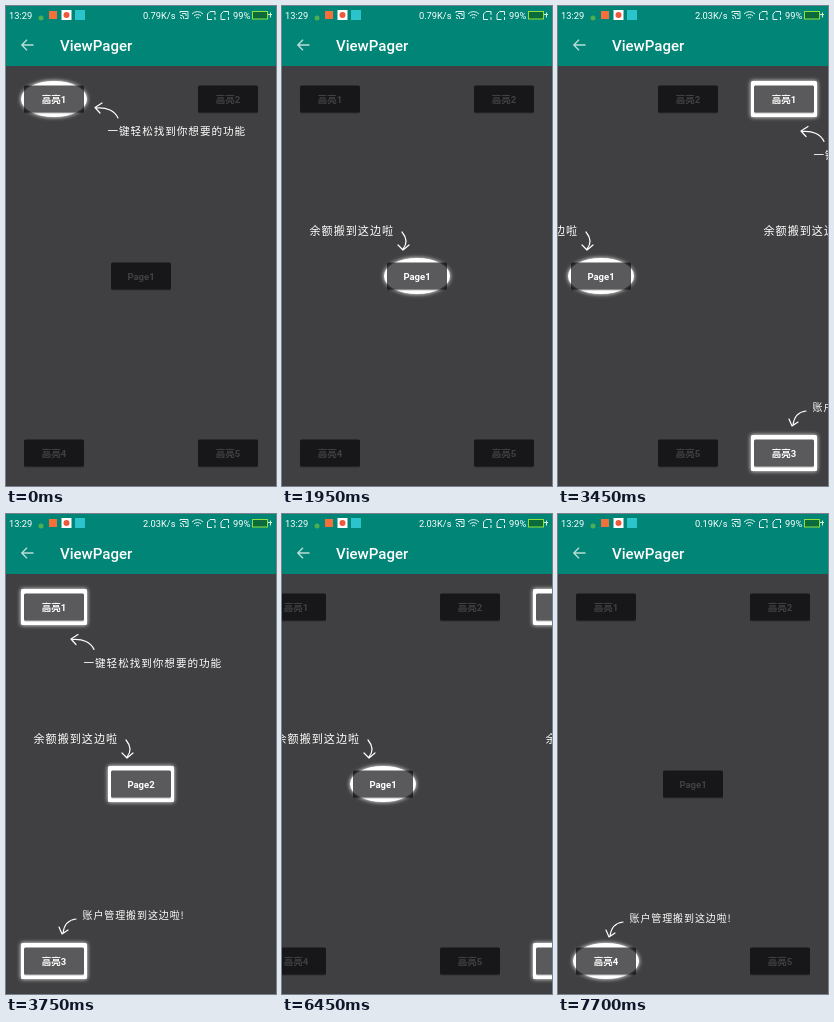
Animation, 270 px wide and 480 px high, one loop 8000 ms. Source, as an HTML page:

```html
<!DOCTYPE html>
<html lang="zh">
<head>
<meta charset="utf-8">
<title>ViewPager</title>
<style>
  html, body { margin: 0; height: 100%; overflow: hidden; background: #403e41; }
  svg { display: block; width: 100vw; height: 100vh; }
  text { font-family: Roboto, "Noto Sans CJK SC", "Noto Sans CJK", sans-serif; fill: #fff; }
  .status text { font-size: 9.3px; }
  .title { font-size: 15px; font-weight: 500; }
  .label { font-size: 9.5px; font-weight: 700; text-anchor: middle; }
  .tip text {
    font-family: "Noto Sans CJK SC", "Noto Sans CJK", sans-serif;
    font-weight: 300; letter-spacing: .09em;
  }
  .line { fill: none; stroke: #fff; stroke-width: 1.2; stroke-linecap: round; stroke-linejoin: round; }
  .icon { fill: none; stroke: #e4f3f1; stroke-width: 1; }
</style>
</head>
<body>
<svg viewBox="0 0 270 480" preserveAspectRatio="none">
  <defs>
    <filter id="glow" filterUnits="userSpaceOnUse" x="0" y="60" width="270" height="420">
      <feGaussianBlur stdDeviation="2.2"/>
    </filter>
  </defs>
  <g id="page1"></g>
  <g id="page2"></g>
  <rect width="270" height="60" fill="#008577"/>
  <g class="status">
    <text x="3" y="13">13:29</text>
    <circle cx="35" cy="12" r="2.5" fill="#4caf50"/>
    <rect x="43" y="5" width="8" height="8" fill="#f4703a"/>
    <rect x="55.500" y="4" width="10" height="10" fill="#fff"/>
    <circle cx="60.500" cy="9" r="3" fill="#f0583c"/>
    <rect x="69" y="4" width="10" height="10" fill="#2cc4cc"/>
    <text id="speed" x="169.500" y="13" text-anchor="end"></text>
    <path class="icon" d="M174 7V5.500H182V12.500H179M174 9a4 4 0 0 1 4 4M174 11.500a1.500 1.500 0 0 1 1.500 1.500M176 7.500H180V10"/>
    <path class="icon" d="M186 8a7.500 7.500 0 0 1 11 0M188 10a5 5 0 0 1 7 0M190 12a2.200 2.200 0 0 1 3 0"/>
    <path class="icon" d="M209 9V5.500H204L201.500 8V13.500H206M209 11V14M222.500 9V5.500H217.500L215 8V13.500H219.500M222.500 11V14"/>
    <text x="227" y="13">99%</text>
    <rect x="246.500" y="5.500" width="15" height="7.500" fill="#0b6b3c" stroke="#8fe03c"/>
    <path d="M262 8.500h4M264.500 6.500v5" stroke="#d8f5c8"/>
  </g>
  <path d="M27.500 39H16M21 33.800L15.800 39L21 44.200" fill="none" stroke="#b9dcd8" stroke-width="1.400"/>
  <text class="title" x="54" y="45">ViewPager</text>
</svg>
<script>
const $ = id => document.getElementById(id);

const button = ([label, x, y]) => `
  <rect x="${x - 30}" y="${y - 12.5}" width="60" height="27" rx="1.500" fill="#000" opacity=".25"/>
  <rect x="${x - 30}" y="${y - 13.5}" width="60" height="27" rx="1.500" fill="#5a595b"/>
  <text class="label" x="${x}" y="${y + 3.5}">${label}</text>`;

const oval = (x, y) => `<ellipse cx="${x}" cy="${y}" rx="33" ry="18"/>`;
const box = (x, y) => `<rect x="${x - 33}" y="${y - 18}" width="66" height="36" rx="1.500"/>`;

const tip = (text, x, y, size, arrow, dx = 0, dy = 0) => `
  <g class="tip" transform="translate(${dx} ${dy})">
    <text x="${x}" y="${y}" font-size="${size}">${text}</text>${arrow}
  </g>`;
const line = (d, dash = 'none') => `<path class="line" d="${d}" stroke-dasharray="${dash}"/>`;

const findTip = (dx, dy) => tip('一键轻松找到你想要的功能', 101.5, 129, 10.6,
  line('M112 112C109 105 101 101 90 102M96 97L89 101.500L94 107'), dx, dy);
const settingsTip = tip('设置移动到这里啦', 51.5, 162.5, 12.1,
  line('M160 148C162 138 172 135 173 126C173 119 164 119 163 125C163 132 174 131 177 122L178 110', '2.5 2')
  + line('M174 113L178 108.500L181 112'));
const balanceTip = tip('余额搬到这边啦', 27.5, 229, 11.1,
  line('M120 226C125 232 125 238 121 243M116 239L121 244L127 239'));
const accountTip = (dx, dy) => tip('账户管理搬到这边啦!', 71.5, 407.5, 10,
  line('M65 408C57 409 53 414 52 422M48 416L51 423L57 419'), dx, dy);

// Dark overlay with softly glowing holes, plus the hints on top of it
const overlay = (id, holes, tips) => `
  <g id="${id}">
    <mask id="${id}-mask" maskUnits="userSpaceOnUse" x="0" y="60" width="270" height="420">
      <rect y="60" width="270" height="420" fill="#fff"/>
      <g filter="url(#glow)">${holes}</g>${holes}
    </mask>
    <rect y="60" width="270" height="420" fill="#020003" fill-opacity=".752" mask="url(#${id}-mask)"/>
    ${tips}
  </g>`;

const page = (buttons, overlays) =>
  '<rect y="60" width="270" height="420" fill="#fff"/>' + buttons.map(button).join('') + overlays;

$('page1').innerHTML = page(
  [['高亮1', 48, 93], ['高亮2', 222, 93], ['Page1', 135, 270], ['高亮4', 48, 447], ['高亮5', 222, 447]],
  overlay('step0', oval(48, 93), findTip(0, 0)) +
  overlay('step1', oval(222, 93), settingsTip) +
  overlay('step2', oval(135, 270), balanceTip) +
  overlay('step3', oval(48, 447), accountTip(0, 0)));

$('page2').innerHTML = page(
  [['高亮1', 48, 93], ['Page2', 135, 270], ['高亮3', 48, 447]],
  overlay('all', box(48, 93) + box(135, 270) + box(48, 447),
    findTip(-24, 23.5) + balanceTip + accountTip(5, -3)));

// Finger drag that accelerates, then a quintic settle onto the next page
function swipe(t, start, dragTime, dragged, power, settleTime) {
  if (t <= start) return 0;
  const drag = (t - start) / dragTime;
  if (drag < 1) return dragged * drag ** power;
  const settle = Math.min(1, (t - start - dragTime) / settleTime);
  return 270 - (270 - dragged) * (1 - settle) ** 5;
}

function draw(now) {
  const t = now % 8000;
  const step = [800, 1950, 7200].filter(at => t >= at).length;
  for (let i = 0; i < 4; i++) $('step' + i).style.display = i === step ? '' : 'none';

  const scroll = Math.round(swipe(t, 3350, 100, 90, 2, 400) - swipe(t, 6100, 200, 126, 2.2, 600));
  $('page1').setAttribute('transform', `translate(${-scroll} 0)`);
  $('page2').setAttribute('transform', `translate(${270 - scroll} 0)`);

  $('speed').textContent = t < 2200 ? '0.79K/s' : t < 7400 ? '2.03K/s' : '0.19K/s';
  requestAnimationFrame(() => draw(performance.now() - origin));
}
const origin = performance.now();
draw(0);
</script>
</body>
</html>
```
